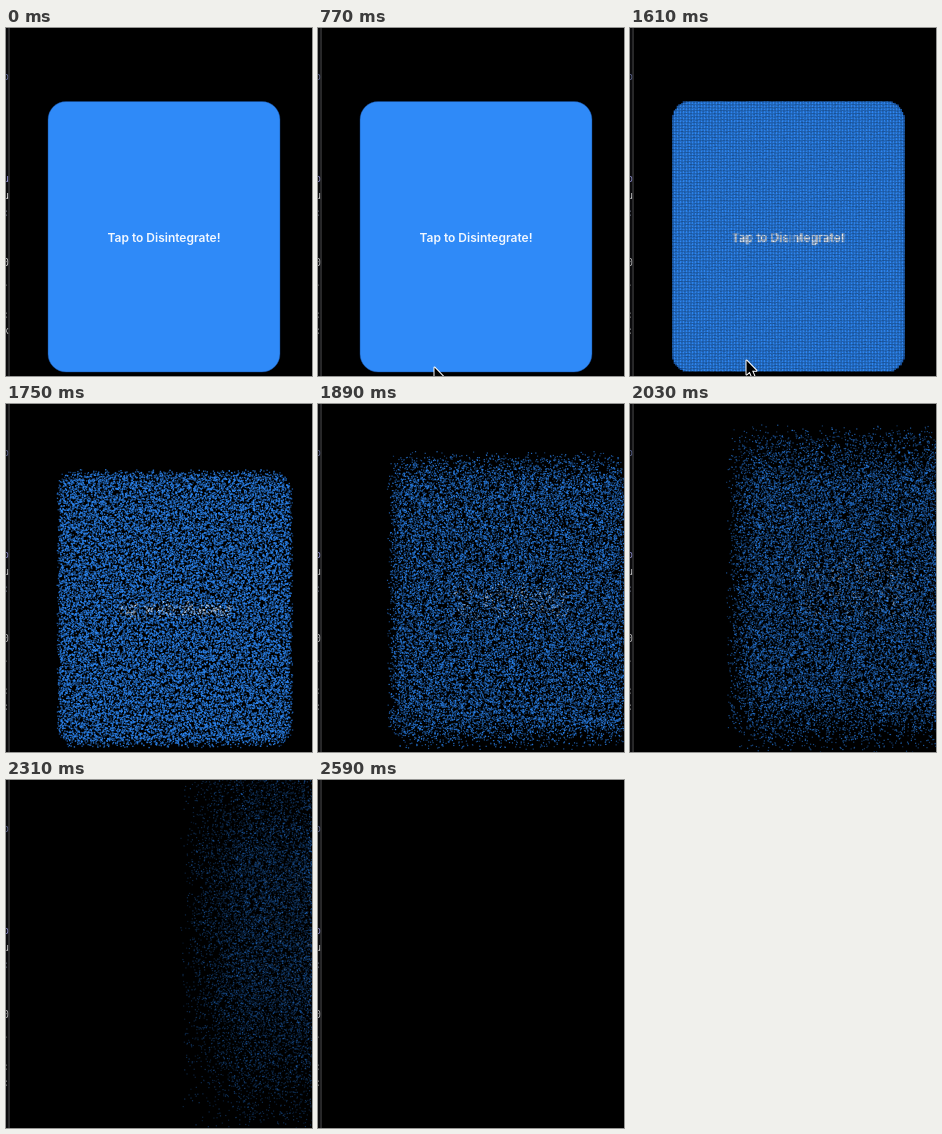
Write an HTML page with a canvas that moves like this. It is 306 px wide and 348 px high and loops after 2870 ms.

```html
<!DOCTYPE html>
<html lang="en">
<head>
<meta charset="utf-8">
<title>Tap to Disintegrate</title>
<style>
  html, body { margin: 0; width: 100%; height: 100%; overflow: hidden; background: #000; }
  canvas { display: block; }
</style>
</head>
<body>
<canvas id="stage" width="306" height="348"></canvas>
<script>
const W = 306, H = 348, LOOP = 2870, STEP = 70;
const BURST = 1610, GONE = 2590;
const CARD = { x: 42, y: 73.5, w: 232, h: 270.5, r: 18 };
const GRAIN = 1.5;

// Pointer tip for each span of time: [from, until, x, y]
const POINTER = [
  [140, 210, 143, 338], [210, 280, 136, 343],
  [770, 840, 116.5, 339.5],
  [1190, 1260, 94, 340], [1260, 1330, 110, 322],
  [1330, 1400, 129, 312], [1400, 1680, 116.5, 332.5]
];
const ARROW = new Path2D('M0 0V14L3.2 11.2L5.4 16.2L7.8 15.2L5.6 10.3H10Z');

const ctx = document.getElementById('stage').getContext('2d');

function randomFrom(seed) {
  return () => {
    seed = (Math.imul(seed, 1664525) + 1013904223) >>> 0;
    return seed / 4294967296;
  };
}

function makeCard() {
  const layer = document.createElement('canvas');
  layer.width = W;
  layer.height = H;
  const c = layer.getContext('2d', { willReadFrequently: true });
  c.beginPath();
  c.roundRect(CARD.x, CARD.y, CARD.w, CARD.h, CARD.r);
  c.fillStyle = '#2f8af8';
  c.fill();
  c.strokeStyle = 'rgba(20, 65, 135, .55)';
  c.lineWidth = 0.8;
  c.stroke();
  c.font = '600 12px Inter, "Open Sans", sans-serif';
  c.textAlign = 'center';
  c.fillStyle = '#f1f7ff';
  c.fillText('Tap to Disintegrate!', 158, 213.5);
  return layer;
}

// One grain per small cell of the card, coloured by what lies beneath it
function makeGrains(layer) {
  const random = randomFrom(71);
  const pixels = layer.getContext('2d').getImageData(0, 0, W, H).data;
  const grains = [];
  for (let y = CARD.y; y < CARD.y + CARD.h; y += GRAIN) {
    for (let x = CARD.x; x < CARD.x + CARD.w; x += GRAIN) {
      const i = 4 * (Math.floor(y + GRAIN / 2) * W + Math.floor(x + GRAIN / 2));
      if (pixels[i + 3] < 128) continue;
      grains.push({
        x, y,
        color: `rgb(${pixels[i]}, ${pixels[i + 1]}, ${pixels[i + 2]})`,
        vx: 0.95 + 0.5 * random(),
        vy: 0.1 - 1.05 * random(),
        dim: 0.5 * random()
      });
    }
  }
  return grains;
}

const card = makeCard();
const grains = makeGrains(card);

function drawEditorEdge(t) {
  const fresh = t < 140;
  ctx.fillStyle = '#0b0b0d';
  ctx.fillRect(0, 0, 3, H);
  ctx.fillStyle = '#39393b';
  ctx.fillRect(2.4, 0, 1.3, H);
  ctx.save();
  ctx.beginPath();
  ctx.rect(0, 0, 2.6, H);
  ctx.clip();
  ctx.font = '10px "DejaVu Sans Mono", monospace';
  ctx.textAlign = 'right';
  ctx.globalAlpha = fresh ? 1 : 0.85;
  const glyph = (text, y, color) => {
    ctx.fillStyle = color;
    ctx.fillText(text, 3, y);
  };
  glyph('o', 52, '#6670a0');
  glyph(fresh ? 'u' : 'o', 154, '#9a9ae0');
  glyph('u', 171, '#e4e4e4');
  glyph(':', 188, '#777b90');
  glyph('0', 238, '#c8c8c8');
  glyph('.', 258, '#707070');
  glyph(':', 290, '#8c8c8c');
  glyph(fresh ? 'x' : ':', 306, '#b4b4b4');
  ctx.restore();
}

function drawGrains(t) {
  const age = t - BURST + 20;
  const travel = 9 * (age / 160) ** 1.82;
  const fade = Math.max(0, 1 - (age / 1000) ** 1.3);
  const size = GRAIN - 0.3 * Math.min(1, age / 300);
  const variety = Math.min(1, age / 160);
  for (const g of grains) {
    ctx.globalAlpha = fade * (1 - g.dim * variety);
    ctx.fillStyle = g.color;
    ctx.fillRect(g.x + g.vx * travel, g.y + g.vy * travel, size, size);
  }
  ctx.globalAlpha = 1;
}

function drawPointer(t) {
  const spot = POINTER.find(([from, until]) => t >= from && t < until);
  if (!spot) return;
  ctx.save();
  ctx.translate(spot[2], spot[3]);
  ctx.lineJoin = 'round';
  ctx.lineWidth = 2;
  ctx.strokeStyle = '#fff';
  ctx.stroke(ARROW);
  ctx.fillStyle = '#000';
  ctx.fill(ARROW);
  ctx.restore();
}

function draw(t) {
  ctx.fillStyle = '#000';
  ctx.fillRect(0, 0, W, H);
  if (t < BURST) ctx.drawImage(card, 0, 0);
  else if (t < GONE) drawGrains(t);
  drawEditorEdge(t);
  drawPointer(t);
}

const start = performance.now();
let shown = -1;
function tick() {
  const t = Math.floor(((performance.now() - start) % LOOP) / STEP) * STEP;
  if (t !== shown) draw(shown = t);
  requestAnimationFrame(tick);
}
tick();
</script>
</body>
</html>
```
